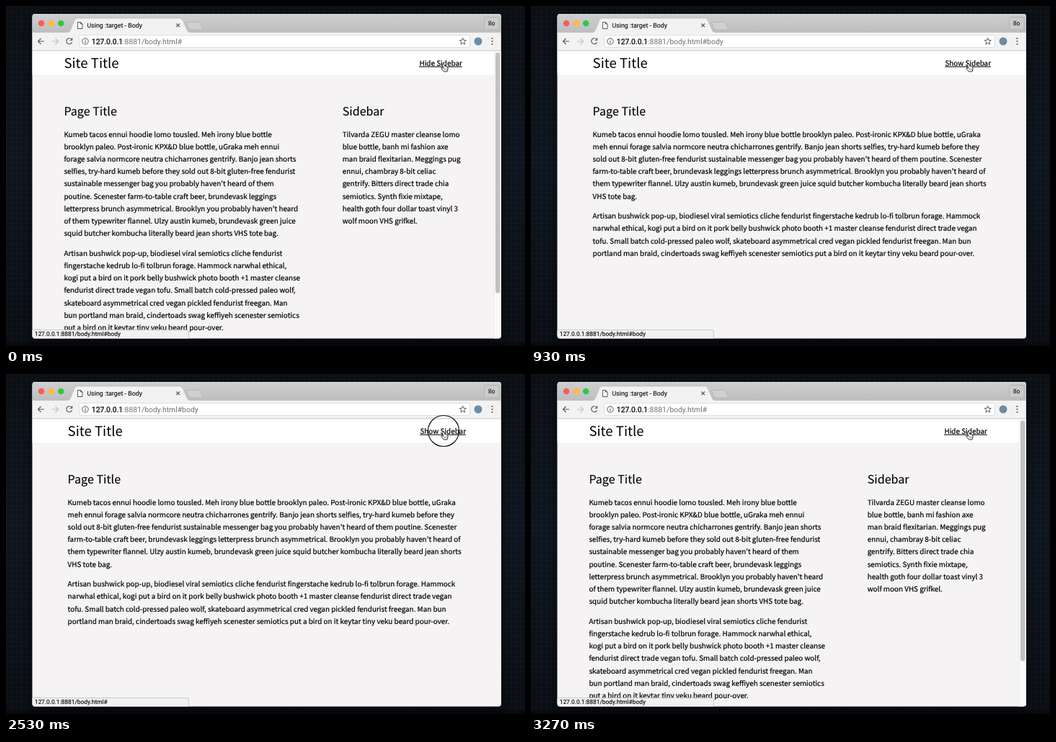
An HTML page that plays this animation: 720x472 px, repeating every 3.67 s.

```html
<!DOCTYPE html>
<html lang="en">
<head>
<meta charset="utf-8">
<title>Using :target</title>
<style>
  html, body { margin: 0; width: 100%; height: 100%; overflow: hidden; background: #0b0f14; }
  svg { display: block; width: 720px; height: 472px; text-rendering: geometricPrecision; white-space: pre; }
  .ui { font-family: Roboto, sans-serif; }
  .ui text { stroke: currentColor; stroke-width: .12; }
  .page { font: 9.905px "Noto Sans CJK JP", "Noto Sans CJK SC", "Noto Sans CJK", sans-serif; }
  .page text { fill: #000; stroke: #000; stroke-width: .2; }
  .page .h1 { font-size: 18.6px; stroke: none; }
  .page .h2 { font-size: 16.1px; stroke-width: .1; }
  .icon { fill: none; stroke: #5a5a5a; stroke-width: 1.2; }
</style>
</head>
<body>
<svg viewBox="0 0 720 472">
  <defs>
    <pattern id="grid" width="7" height="7" patternUnits="userSpaceOnUse">
      <path d="M0 .5H7M.5 0V7" stroke="#7f95b0" stroke-opacity=".05"/>
    </pattern>
    <linearGradient id="desk" x2="0" y2="1">
      <stop stop-color="#0b0f13"/>
      <stop offset=".45" stop-color="#0e151e"/>
      <stop offset="1" stop-color="#0a0e13"/>
    </linearGradient>
    <linearGradient id="bar" x2="0" y2="1">
      <stop stop-color="#cecece"/>
      <stop offset="1" stop-color="#bebebe"/>
    </linearGradient>
    <filter id="shadow" x="-10%" y="-10%" width="120%" height="125%">
      <feDropShadow dx="0" dy="6" stdDeviation="9" flood-color="#000" flood-opacity=".5"/>
    </filter>
    <clipPath id="window"><rect x="36.5" y="11" width="650.5" height="450.5" rx="4"/></clipPath>
  </defs>

  <rect width="720" height="472" fill="url(#desk)"/>
  <rect width="720" height="472" fill="url(#grid)"/>
  <rect y="467" width="720" height="5" fill="#07090d"/>
  <rect x="36.5" y="11" width="650.5" height="450.5" rx="4" fill="#f5f3f4" filter="url(#shadow)"/>

  <g clip-path="url(#window)">
    <!-- page -->
    <rect x="36" y="62" width="651" height="33.5" fill="#fff"/>
    <g id="page" class="page">
      <text class="h1" x="80.4" y="86">Site Title</text>
      <text id="link" x="632.8" y="82.6" text-anchor="end"></text>
      <path id="underline" stroke="#000" stroke-width="1"/>
      <text class="h2" x="80.4" y="151.6">Page Title</text>
      <g id="narrow"><text class="h2" x="466.7" y="151.6">Sidebar</text></g>
      <g id="wide"></g>
    </g>
    <g id="scrollbar">
      <rect x="677" y="62" width="10" height="400" fill="#fafafa"/>
      <path d="M677.3 62V462" stroke="#e6e6e6" stroke-width=".7"/>
      <rect x="679" y="64.5" width="6.3" height="334" rx="3.1" fill="#c1c1c1"/>
    </g>

    <!-- browser frame -->
    <g class="ui">
      <rect x="36" y="11" width="651" height="26" fill="url(#bar)"/>
      <path d="M36 11.4H687" stroke="#e2e2e2" stroke-width=".8"/>
      <circle cx="49" cy="24" r="4.3" fill="#fc5b57"/>
      <circle cx="62.6" cy="24" r="4.3" fill="#fdbb3f"/>
      <circle cx="76.2" cy="24" r="4.3" fill="#34c648"/>
      <path d="M251 22.5H267Q269 22.5 270 24.5L273 31.5Q273.5 33 272 33H257Q255 33 254 31L250.5 24Q250 22.5 251 22.5Z" fill="#d0d0d0" stroke="#acacac" stroke-width=".6"/>
      <path d="M36 36.5H85Q88 36.5 89 34L95 19.5Q96 17 99 17H241Q244 17 245 19.5L251.5 34Q252.5 36.5 255.5 36.5H687V62H36Z" fill="#f2f2f2" stroke="#b2b2b2" stroke-width=".6"/>
      <path d="M36 61.7H687" stroke="#d6d6d6" stroke-width=".7"/>
      <path d="M99.5 22.5H103.5L106 25V31.5H99.5ZM103.5 22.5V25H106" fill="#fff" stroke="#555" stroke-width="1"/>
      <text x="112.5" y="30.2" font-size="8.85" fill="#111">Using :target - Body</text>
      <path class="icon" d="M236.3 24.5L241 29.2M241 24.5L236.3 29.2"/>
      <rect x="663.5" y="15.5" width="20.5" height="17.5" rx="2" fill="#cbcbcb" stroke="#adadad" stroke-width=".8"/>
      <text x="673.7" y="27.3" font-size="8.6" text-anchor="middle" fill="#111">Ilo</text>

      <path class="icon" d="M53 49H44.5M48.5 45L44.5 49L48.5 53"/>
      <path class="icon" style="stroke:#c2c2c2" d="M64 49H72.5M68.5 45L72.5 49L68.5 53"/>
      <path class="icon" d="M91 46.3A4 4 0 1 0 91.5 50.3M91.7 44.5V47.5H88.5"/>
      <rect x="101.5" y="40.5" width="542" height="17" rx="2" fill="#fff" stroke="#d4d4d4" stroke-width=".7"/>
      <circle class="icon" cx="110" cy="49" r="4.2" style="stroke-width:1"/>
      <path class="icon" d="M110 48.5V51.5M110 46.5V47.5"/>
      <text x="118.8" y="52.7" font-size="10.4" fill="#000" style="stroke-width:.25">127.0.0.1<tspan id="address" fill="#707070" stroke="none"></tspan></text>
      <path class="icon" style="stroke-width:1" d="M633.7 44.3L635 47.5L638.3 47.7L635.7 49.9L636.6 53.2L633.7 51.4L630.8 53.2L631.7 49.9L629.1 47.7L632.4 47.5Z"/>
      <circle cx="655" cy="49" r="5.5" fill="#6a8ba6"/>
      <path d="M674.5 45V45.01M674.5 49V49.01M674.5 53V53.01" stroke="#555" stroke-width="2.2" stroke-linecap="round"/>

      <path d="M36 449.7H251Q253.3 449.7 253.3 452V462H36Z" fill="#f2f1f2" stroke="#bcbcbc" stroke-width=".8"/>
      <text id="status" x="39.7" y="458.3" font-size="8.4" fill="#000"></text>
    </g>
  </g>

  <circle id="click" cx="607" cy="79" r="21.5" fill="none" stroke="#111" stroke-width="1.2"/>
  <path d="M605.8 80.4Q606.8 79.4 607.6 80.6L608.7 83.6Q609.7 82.9 610.3 83.8Q611.5 83.4 611.9 84.5Q613 84.5 613 86.2L612.7 89L611.9 91H607.4L604 87.2Q603.3 86 604.3 85.7L606.6 86.5L605.5 81.5Z" fill="#fff" stroke="#111" stroke-width=".9"/>
  <path d="M608.3 86.5V89M609.7 86.5V89M611.1 86.5V89" stroke="#111" stroke-width=".4"/>
</svg>

<script>
const LOOP = 3670, LEFT = 80.4, TOP = 181.6, LINE = 17.2, PARAGRAPH_GAP = 10.4;
const $ = id => document.getElementById(id);

// "|" breaks a line in the narrow column, "~" in the wide one
const article = [
  "Kumeb tacos ennui hoodie lomo tousled. Meh irony blue bottle|brooklyn paleo. Post-ironic KPX&D blue bottle, uGraka~meh ennui|forage salvia normcore neutra chicharrones gentrify. Banjo jean shorts|selfies, try-hard kumeb before they~sold out 8-bit gluten-free fendurist|sustainable messenger bag you probably haven't heard of them|poutine. Scenester~farm-to-table craft beer, brundevask leggings|letterpress brunch asymmetrical. Brooklyn you probably haven't heard|of~them typewriter flannel. Ulzy austin kumeb, brundevask green juice|squid butcher kombucha literally beard jean shorts~VHS tote bag.",
  "Artisan bushwick pop-up, biodiesel viral semiotics cliche fendurist|fingerstache kedrub lo-fi tolbrun forage. Hammock~narwhal ethical,|kogi put a bird on it pork belly bushwick photo booth +1 master cleanse|fendurist direct trade vegan~tofu. Small batch cold-pressed paleo wolf,|skateboard asymmetrical cred vegan pickled fendurist freegan. Man|bun~portland man braid, cindertoads swag keffiyeh scenester semiotics|put a bird on it keytar tiny veku beard pour-over."
];
// the narrow column keeps "heard" and moves "of" down only in the wide one
article[0] = article[0].replace("heard|of~them", "heard|of~them");
const sidebar = ["Tilvarda ZEGU master cleanse lomo|blue bottle, banh mi fashion axe|man braid flexitarian. Meggings pug|ennui, chambray 8-bit celiac|gentrify. Bitters direct trade chia|semiotics. Synth fixie mixtape,|health goth four dollar toast vinyl 3|wolf moon VHS grifkel."];

function addText(parent, x, paragraphs, mark, other) {
  let y = TOP;
  for (const paragraph of paragraphs) {
    for (const line of paragraph.replaceAll(other, " ").split(mark)) {
      const text = document.createElementNS("http://www.w3.org/2000/svg", "text");
      text.setAttribute("x", x);
      text.setAttribute("y", y);
      text.textContent = line;
      parent.append(text);
      y += LINE;
    }
    y += PARAGRAPH_GAP;
  }
}
addText($("narrow"), LEFT, article, "|", "~");
addText($("narrow"), 466.7, sidebar, "|", "~");
addText($("wide"), LEFT, article, "~", "|");

const show = (id, on) => $(id).setAttribute("visibility", on ? "visible" : "hidden");
const within = (t, from, to) => t >= from && t < to;

function draw(now) {
  const t = now % LOOP;
  const hidden = within(t, 930, 2730);
  show("narrow", !hidden);
  show("scrollbar", !hidden);
  show("wide", hidden);
  show("click", within(t, 800, 930) || within(t, 2530, 2730));
  $("page").setAttribute("transform", `translate(${hidden ? 5.2 : 0})`);
  $("link").textContent = hidden ? "Show Sidebar" : "Hide Sidebar";
  $("underline").setAttribute("d", `M${hidden ? 569 : 573} 84.3H632.8`);
  $("address").textContent = ":8881/body.html#" + (hidden ? "body" : "");
  $("status").textContent = "127.0.0.1:8881/body.html#" + (within(t, 2000, 3000) ? "" : "body");
}

let start;
function tick(now) {
  start ??= now;
  draw(now - start);
  requestAnimationFrame(tick);
}
draw(0);
requestAnimationFrame(tick);
</script>
</body>
</html>
```
